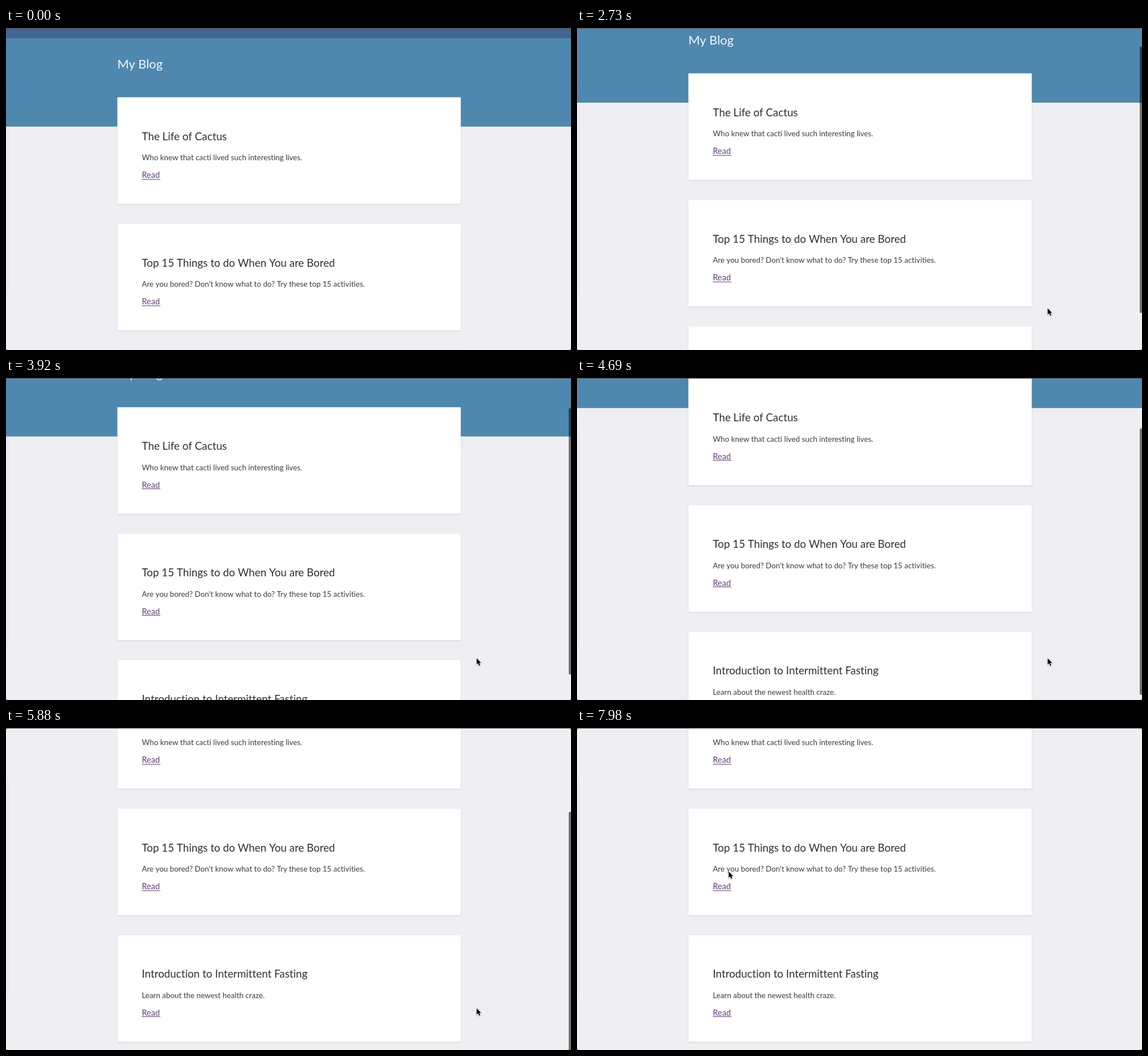
Write an HTML page with a canvas that moves like this. It is 992 by 565 pixels and loops after 8000 ms.

```html
<!DOCTYPE html>
<html lang="en">
<head>
<meta charset="utf-8">
<title>Blog scroll</title>
<style>
  html, body { margin: 0; width: 100%; height: 100%; overflow: hidden; background: #efeef3; }
  canvas { display: block; width: 992px; height: 565px; }
</style>
</head>
<body>
<canvas id="stage" width="992" height="565"></canvas>
<script>
const W = 992, H = 565, LOOP = 8000, STEP = 70;
const ctx = document.getElementById('stage').getContext('2d');

const posts = [
  ['The Life of Cactus', 'Who knew that cacti lived such interesting lives.'],
  ['Top 15 Things to do When You are Bored',
   "Are you bored? Don't know what to do? Try these top 15 activities."],
  ['Introduction to Intermittent Fasting', 'Learn about the newest health craze.']
];

const progress = (t, from, to) => Math.min(1, Math.max(0, (t - from) / (to - from)));
const lerp = (a, b, p) => a + (b - a) * p;
const easeOut = p => 1 - (1 - p) ** 1.5;
const smooth = p => p * p * (3 - 2 * p);
const bezier = (a, b, c, p) => lerp(lerp(a, b, p), lerp(b, c, p), p);

// A quick flick, then a longer and steadier drag
function scrollAt(t) {
  const flick = easeOut(progress(t, 2170, 3360));
  const p = progress(t, 3850, 5880);
  return 68.3 * flick + 133.7 * lerp(p, smooth(p), 0.6);
}

function cursorAt(t) {
  if (t < 7280) {
    const p = easeOut(progress(t, 910, 1470));
    return [lerp(606, 826, p), bezier(556, 510, 491, p)];
  }
  const p = smooth(progress(t, 7280, 7980));
  return [bezier(826, 262, 266, p), bezier(491, 98, 251, p)];
}

function rect(x, y, w, h, color) {
  ctx.fillStyle = color;
  ctx.fillRect(x, y, w, h);
}

function roundRect(x, y, w, h, r, color) {
  ctx.beginPath();
  ctx.roundRect(x, y, w, h, r);
  ctx.fillStyle = color;
  ctx.fill();
}

function setShadow(alpha, blur) {
  ctx.shadowColor = `rgba(0,0,0,${alpha})`;
  ctx.shadowBlur = blur;
  ctx.shadowOffsetY = 1;
}

function text(str, x, y, size, color) {
  ctx.font = `400 ${size}px Lato, "Open Sans", sans-serif`;
  ctx.letterSpacing = '0.01px'; // turns ligatures off
  ctx.fillStyle = color;
  ctx.fillText(str, x, y);
}

function drawCard([title, summary], y) {
  ctx.save();
  setShadow(0.12, 3);
  roundRect(195.5, y, 603, 187, 1, '#fff');
  ctx.restore();
  text(title, 238.5, y + 75, 18.75, '#303030');
  text(summary, 238.5, y + 110.5, 13.35, '#3c3c3c');
  text('Read', 238.5, y + 141.5, 14.5, '#61407f');
  rect(238.5, Math.round(y + 143), 32.5, 1, '#61407f');
}

function drawPage(scroll) {
  rect(0, 0, W, H, '#efeef3');
  rect(0, -scroll, W, 173, '#4f88af');
  rect(0, -scroll, W, 18, '#42648f');
  text('My Blog', 195.5, 70.5 - scroll, 21.8, '#f4f8fa');
  posts.forEach((post, i) => drawCard(post, 121.6 + i * 221.9 - scroll));
}

function drawEdgeShade() {
  ctx.beginPath();
  ctx.moveTo(0, 84);
  ctx.quadraticCurveTo(6.5, 96, 6.5, 120);
  ctx.lineTo(6.5, 435);
  ctx.quadraticCurveTo(6.5, 466, 0, 478);
  ctx.fillStyle = 'rgba(0,0,0,.016)';
  ctx.fill();
}

function drawScrollbar(t, scroll) {
  if (t < 2240) return;
  ctx.globalAlpha = 1 - progress(t, 6720, 6930);
  roundRect(988, 2.5 + scroll * 0.715, 6, 467.5, 2.5, 'rgba(0,0,0,.53)');
  ctx.globalAlpha = 1;
}

function drawCursor(t) {
  if (t < 910) return;
  const [x, y] = cursorAt(t);
  ctx.save();
  ctx.translate(x + 0.4, y + 0.8);
  ctx.scale(0.92, 0.92);
  ctx.beginPath();
  [[0, 0], [0, 12], [2.8, 9.5], [4.7, 14], [6.7, 13.1], [4.9, 8.8], [8.4, 8.6]]
    .forEach(p => ctx.lineTo(...p));
  ctx.closePath();
  setShadow(0.3, 2);
  ctx.strokeStyle = '#fff';
  ctx.lineWidth = 1.6;
  ctx.lineJoin = 'round';
  ctx.stroke();
  ctx.shadowColor = 'transparent';
  ctx.fillStyle = '#000';
  ctx.fill();
  ctx.restore();
}

function draw(now) {
  const t = Math.floor((now % LOOP) / STEP) * STEP;
  const scroll = scrollAt(t);
  rect(0, 0, W, H, '#505256');
  ctx.save();
  ctx.beginPath();
  ctx.roundRect(0, 1, W, H - 1, 3);
  ctx.clip();
  drawPage(scroll);
  drawEdgeShade();
  drawScrollbar(t, scroll);
  drawCursor(t);
  ctx.restore();
}

const start = performance.now();
function tick() {
  draw(performance.now() - start);
  requestAnimationFrame(tick);
}
tick();
</script>
</body>
</html>
```
